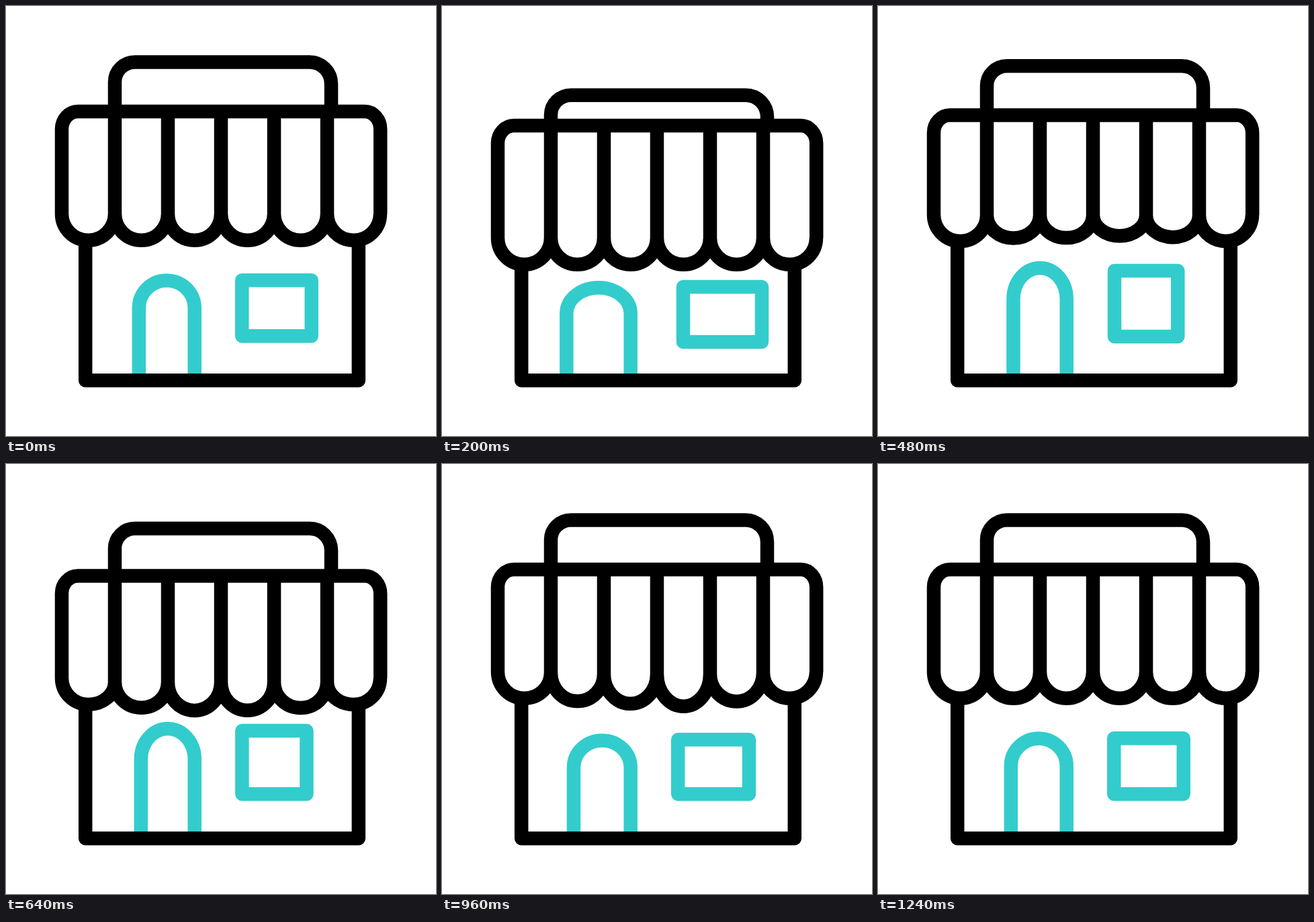
An HTML page that plays this animation: 640 px wide and 640 px high, repeating every 1820 ms.

```html
<!DOCTYPE html>
<html lang="en">
<head>
<meta charset="utf-8">
<title>Shop</title>
<style>
html, body { margin: 0; width: 100%; height: 100%; overflow: hidden; background: #fff; }
svg { display: block; width: 100vw; height: 100vh; }
path { fill: none; stroke: #000; stroke-width: 20.5; stroke-linejoin: round; }
.accent { stroke: #33cccc; }
</style>
</head>
<body>
<svg viewBox="0 0 640 640">
  <path id="door" class="accent"/>
  <path id="pane" class="accent"/>
  <path id="body"/>
  <path id="sign"/>
  <path id="awning"/>
</svg>
<script>
const LOOP = 1820, STEP = 20;
const EDGES = [83, 162, 241, 320, 399, 478, 557];

// Each track is a list of [time, value] extremes, eased in and out between them.
const bounce = (first, time, second, start = 370) =>
  [[0, 0], [185, first], [370, 0], [start, 0], [time, second], [880, 0]];
const swing = (rest, wide, tall, settle) =>
  [[0, rest], [260, wide], [520, tall], [880, settle], [1240, rest]];
const flap = (up, time, down) => [[370, 0], [490, up], [time, down], [1240, 0]];

const signDrop = bounce(50.2, 610, 13.1);
const awningDrop = bounce(21.4, 585, 10.4);
const hemDrop = bounce(36.7, 650, 9.2, 430);

const still = [[0, 0]];
const outerSeam = [[430, 0], [660, 6.5], [1100, 0]];
const innerSeam = [[430, 0], [680, 7], [1240, 0]];
const seams = [still, outerSeam, innerSeam, innerSeam, innerSeam, outerSeam, still];
const flaps = [
  still,
  flap(-4.7, 710, 7.8),
  flap(-5, 720, 14.4),
  flap(-8, 750, 19.5),
  flap(-6, 710, 8.5),
  still
];

const doorLeft = swing(197.8, 183.4, 202.7, 195.7);
const doorTop = swing(408.4, 421, 387.8, 412);
const doorSpring = swing(449.6, 458.8, 434.5, 452);
const paneLeft = swing(351.2, 360.2, 351.4, 351.2);
const paneRight = swing(454.7, 479.3, 444, 457.3);
const paneTop = swing(408.3, 419.4, 392.4, 410.6);
const paneBottom = swing(491.3, 501.3, 491.4, 491.3);

function at(track, t) {
  if (t <= track[0][0]) return track[0][1];
  for (let i = 1; i < track.length; i++) {
    const [t0, a] = track[i - 1], [t1, b] = track[i];
    if (t < t1) {
      const u = (t - t0) / (t1 - t0);
      return a + (b - a) * u * u * (3 - 2 * u);
    }
  }
  return track[track.length - 1][1];
}

const setPath = (id, d) => document.getElementById(id).setAttribute('d', d);

// Quarter ellipses from one side down (or up) to an apex and on to the other side.
const K = 0.5523;
function arch(x0, y0, apex, x1, y1) {
  const mid = (x0 + x1) / 2, k = K * (x1 - x0) / 2;
  return `C${x0} ${y0 + (apex - y0) * K} ${mid - k} ${apex} ${mid} ${apex}` +
    `C${mid + k} ${apex} ${x1} ${y1 + (apex - y1) * K} ${x1} ${y1}`;
}

function draw(t) {
  const signTop = 83.4 + at(signDrop, t);
  const top = 157.1 + at(awningDrop, t);
  const hem = at(hemDrop, t);
  const sides = seams.map(s => 309.3 + hem + at(s, t));

  setPath('sign', `M162 ${top}V${signTop + 29.5}A30 29.5 0 0 1 192 ${signTop}` +
    `H452A32 32.5 0 0 1 484 ${signTop + 32.5}V${top}`);

  let awning = `M83 ${sides[0]}V${top + 26}A24 26 0 0 1 107 ${top}` +
    `H534A23.2 26.5 0 0 1 557.2 ${top + 26.5}V${sides[6]}`;
  for (let i = 1; i < 6; i++) awning += `M${EDGES[i]} ${top}V${sides[i]}`;
  awning += `M83 ${sides[0]}`;
  flaps.forEach((f, i) => {
    awning += arch(EDGES[i], sides[i], 348.8 + hem + at(f, t), EDGES[i + 1], sides[i + 1]);
  });
  setPath('awning', awning);

  setPath('body', `M118.2 ${349 + hem}V557.2H524.8V${349 + hem}`);

  const left = at(doorLeft, t), spring = at(doorSpring, t);
  setPath('door', `M${left} 550V${spring}` +
    arch(left, spring, at(doorTop, t), 280.7, spring) + 'V550');

  setPath('pane', `M${at(paneLeft, t)} ${at(paneTop, t)}H${at(paneRight, t)}` +
    `V${at(paneBottom, t)}H${at(paneLeft, t)}Z`);
}

const start = performance.now();
function tick() {
  const t = (performance.now() - start) % LOOP;
  draw(Math.floor(t / STEP) * STEP);
  requestAnimationFrame(tick);
}
tick();
</script>
</body>
</html>
```
